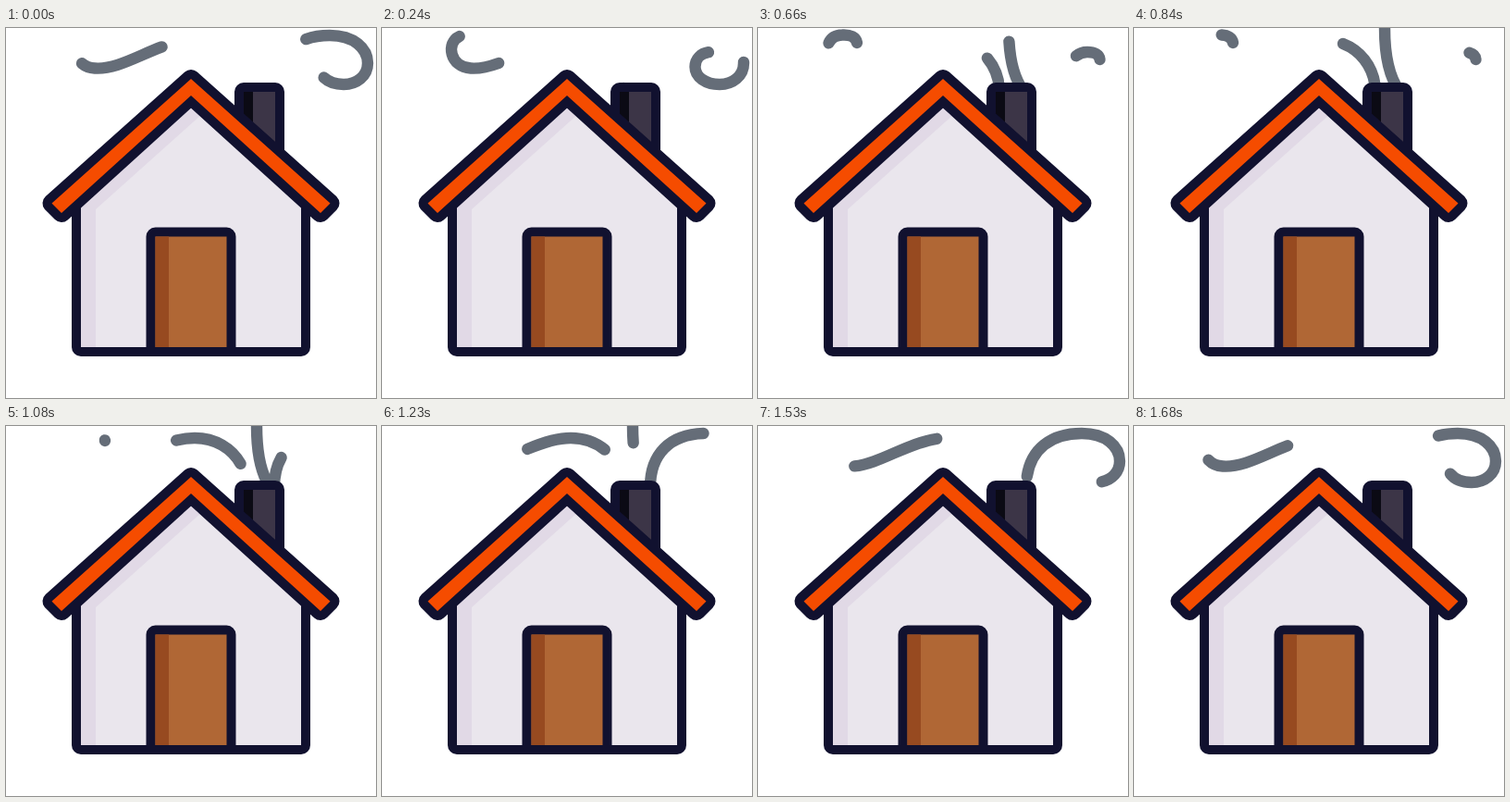
An HTML page that plays this animation: 400 by 400 pixels, repeating every 1.71 s.

```html
<!DOCTYPE html>
<html lang="en">
<head>
<meta charset="utf-8">
<title>House with chimney smoke</title>
<style>
  html, body { margin: 0; width: 100%; height: 100%; overflow: hidden; background: #fff; }
  svg { display: block; width: 100vw; height: 100vh; }
  /* the outline lies outside each filled shape */
  .part { stroke: #11112f; stroke-width: 20; stroke-linejoin: round; paint-order: stroke; }
  #smoke path { fill: none; stroke: #656d78; stroke-width: 12.4; stroke-linecap: round; }
</style>
</head>
<body>
<svg viewBox="0 0 400 400">
  <g id="smoke"></g>

  <g id="chimney">
    <path class="part" fill="#3c3547" d="M257 69H291V135L257 104Z"/>
    <path fill="#0b0a14" d="M257 69H267V113L257 104Z"/>
  </g>

  <g id="walls">
    <path class="part" fill="#eae6ed" d="M81 345V188L200 82L319 188V345Z"/>
    <path fill="#e1d9e6" d="M81 345V188L200 82L212 93L97 196V345Z"/>
  </g>

  <g id="door">
    <path class="part" fill="#b06735" d="M161.500 345V225.500H238.500V345Z"/>
    <path fill="#974a20" d="M161.500 345V225.500H176V345Z"/>
  </g>

  <path class="part" fill="#f54c00" d="M200 55L49.500 189.500L60 200L200 73L340 200L350.500 189.500Z"/>
</svg>

<script>
const LOOP = 1710, STEP = 30, CYCLE = 5000 / 3;

const easeInOut = x => x * x * (3 - 2 * x);
const easeOut = x => 1 - (1 - x) ** 2.25;

// The head runs along the path from start to end; the tail follows after lag
const wisps = [
  {
    d: 'M261 66C259 36 236 13 204 13C165 13 128 46 96 43.5C70 42 68 8 91 7.5C100 7 106 10 107 16',
    start: 167, end: 2333, lag: 500, ease: easeInOut
  },
  {
    d: 'M287 68C275 52 271 28 271 0V-110',
    start: 400, end: 1100, lag: 580, ease: easeInOut
  },
  {
    d: 'M290 66C290 30 312 8 350 8C376 8 391 22 391 38C391 52 379 61 365 61' +
       'C350 61 338.5 53 338.5 42C338.5 32 347 26 356 26C364 26 369 29 369.5 34',
    start: 1005, end: 2333, lag: 500, ease: easeOut
  }
];

const smoke = document.getElementById('smoke');

// Two copies of each wisp, one cycle apart, since a wisp outlives a cycle
for (const wisp of wisps) {
  wisp.paths = [0, 1].map(() => {
    const path = document.createElementNS('http://www.w3.org/2000/svg', 'path');
    path.setAttribute('d', wisp.d);
    return smoke.appendChild(path);
  });
  wisp.length = wisp.paths[0].getTotalLength();
}

function reach({ start, end, ease, length }, age) {
  const x = Math.min(1, Math.max(0, (age - start) / (end - start)));
  return ease(x) * length;
}

function trim(path, wisp, age) {
  const head = reach(wisp, age);
  const tail = reach(wisp, age - wisp.lag);
  const shown = head - tail > 0.01;
  path.style.display = shown ? '' : 'none';
  if (!shown) return;
  path.setAttribute('stroke-dasharray', `${head - tail} ${wisp.length * 2}`);
  path.setAttribute('stroke-dashoffset', -tail);
}

function draw(time) {
  const t = Math.floor((time % LOOP) / STEP) * STEP % CYCLE;
  for (const wisp of wisps)
    wisp.paths.forEach((path, i) => trim(path, wisp, t + i * CYCLE));
}

const begin = performance.now();
function tick() {
  draw(performance.now() - begin);
  requestAnimationFrame(tick);
}
tick();
</script>
</body>
</html>
```
